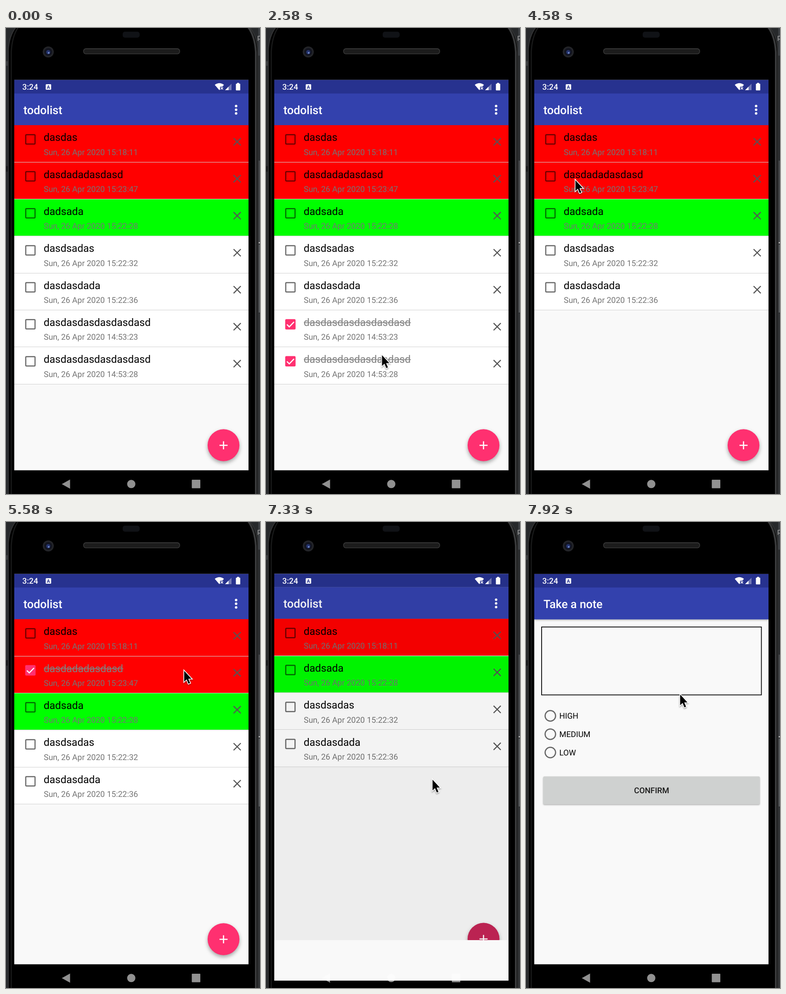
An HTML page with a canvas that plays this animation: 553 by 1012 pixels, repeating every 8 s.

```html
<!DOCTYPE html>
<html lang="en">
<head>
<meta charset="utf-8">
<title>To-do list</title>
<style>
html, body { margin: 0; width: 100%; height: 100%; overflow: hidden; background: #000; }
canvas { display: block; }
</style>
</head>
<body>
<canvas id="stage" width="553" height="1012"></canvas>
<script>
const c = document.getElementById('stage').getContext('2d');
const LOOP = 8000, OPEN = 7278, OPEN_TIME = 425;
const TOP = 112.5, HEIGHT = 848, LEFT = 18, WIDTH = 510, WINDOW_H = 906;
const PINK = '#ff3070', PAPER = '#f9f9f9';

const items = [
  { title: 'dasdas', time: '15:18:11', color: '#f00' },
  { title: 'dasdadadasdasd', time: '15:23:47', color: '#f00', check: 5050, gone: 6080 },
  { title: 'dadsada', time: '15:22:28', color: '#0f0' },
  { title: 'dasdsadas', time: '15:22:32' },
  { title: 'dasdasdada', time: '15:22:36' },
  { title: 'dasdasdasdasdasdasd', time: '14:53:23', check: 1330, gone: 3700 },
  { title: 'dasdasdasdasdasdasd', time: '14:53:28', check: 1830, gone: 4250 }
];

// pointer: time, x, y of the tip
const path = [
  [250, 560, 990], [1000, 88, 660], [1200, 52, 642], [1420, 52, 642], [1700, 53, 722],
  [1950, 53, 722], [2580, 251, 709], [3250, 503, 648], [4270, 503, 648], [4580, 106, 329],
  [4850, 53, 321], [5150, 53, 321], [5800, 506, 322], [6260, 506, 322], [6850, 474, 905],
  [7080, 474, 905], [7330, 361, 558], [7920, 334, 373], [8000, 334, 373]
];

const clamp = v => Math.max(0, Math.min(1, v));
const mix = (a, b, k) => a + (b - a) * k;

// height of a Bezier curve at x, control points as [x, y] pairs
function bezier(x, pts) {
  const at = (u, i) => {
    const v = 1 - u;
    return v * v * v * pts[0][i] + 3 * v * v * u * pts[1][i] + 3 * v * u * u * pts[2][i] + u * u * u * pts[3][i];
  };
  let lo = 0, hi = 1;
  for (let i = 0; i < 24; i++) {
    const mid = (lo + hi) / 2;
    if (at(mid, 0) < x) lo = mid; else hi = mid;
  }
  return at(lo, 1);
}
const slowIn = x => bezier(x, [[0, 0], [.4, 0], [.2, 1], [1, 1]]);
const extraSlowIn = x => x < 1 / 6
  ? bezier(x, [[0, 0], [.05, 0], [.1333, .06], [1 / 6, .4]])
  : bezier(x, [[1 / 6, .4], [.2083, .82], [.25, 1], [1, 1]]);

function rect(x, y, w, h, fill, r = 0) {
  c.beginPath();
  c.roundRect(x, y, w, h, r);
  c.fillStyle = fill;
  c.fill();
}
function disc(x, y, r, fill) {
  c.beginPath();
  c.arc(x, y, r, 0, 7);
  c.fillStyle = fill;
  c.fill();
}
function shape(d, fill) {
  c.fillStyle = fill;
  c.fill(new Path2D(d));
}
function line(d, color, width) {
  c.strokeStyle = color;
  c.lineWidth = width;
  c.stroke(new Path2D(d));
}
function text(str, x, y, size, color, weight = 400, align = 'left') {
  c.font = `${weight} ${size}px Roboto, sans-serif`;
  c.textRendering = 'geometricPrecision';
  c.textAlign = align;
  c.fillStyle = color;
  c.fillText(str, x, y);
}
function shadow(color, blur, y) {
  c.shadowColor = color;
  c.shadowBlur = blur;
  c.shadowOffsetY = y;
}
const noShadow = () => shadow('transparent', 0, 0);

function phone() {
  rect(0, 0, 553, 1012, '#27292b');
  rect(0, 72, 4, 10, '#3b3d3f');
  rect(0, 300, 4, 12, '#17181a');
  rect(549, 0, 4, 60, '#3a3d41');
  rect(550, 288, 3, 177, '#45474a');
  rect(550, 465, 3, 3, '#aaa');
  rect(550, 470, 3, 148, '#55585a');
  rect(550, 620, 3, 392, '#303234');
  text('p', 547, 25, 15, '#aaa');
  const body = 'M22 -2Q7 16 5 48V1014H548V48Q546 16 530 -2Z';
  shape(body, '#000');
  line(body, '#333435', 2);
  line('M27 -2Q13 18 11.5 52V1014', '#191a1a', 2.5);
  line('M527 -2Q542 18 544 52V1014', '#3a3b3c', 4);
  rect(254, 8, 37, 13, '#101216', 5);
  rect(168, 44, 211, 13, '#353535', 6);
  rect(169.5, 46, 208, 9.5, '#1c1c1c', 5);
  disc(92, 52, 12, '#232428');
  disc(92, 52, 8.5, '#12141f');
  disc(92, 52.5, 4.5, '#24336c');
  disc(93, 54, 1.8, '#7f98d8');
}

function statusIcons() {
  text('3:24', 35.5, 134, 17.4, '#fff', 500);
  rect(86.5, 122, 11.8, 12, '#fff', 1.5);
  text('A', 92.4, 131.8, 10.5, '#27328f', 700, 'center');
  shape('M464.5 135L454.5 123.5Q464.5 116 474.5 123.5Z', '#fff');
  rect(466, 127.5, 8, 8, '#27328f');
  line('M467.5 128.5L472.5 133.5M472.5 128.5L467.5 133.5', '#fff', 1.5);
  shape('M477 135L491 121V135Z', 'rgba(255,255,255,.35)');
  shape('M477 135L484.5 127.5V135Z', '#fff');
  rect(500.5, 121, 9.5, 14.5, '#fff', 1);
  rect(503, 119.2, 4.5, 3, '#fff');
}

function bars(title) {
  rect(LEFT, TOP, WIDTH, HEIGHT, PAPER);
  shadow('rgba(0,0,0,.3)', 4, 1.5);
  rect(LEFT, 142, WIDTH, 69.4, '#3341ad');
  noShadow();
  rect(LEFT, TOP, WIDTH, 29.8, '#27328f');
  text(title, 38, 186.7, 25, '#fff', 500);
}

function checkbox(y, k) {
  c.beginPath();
  c.roundRect(43, y - 10, 20.2, 20.2, 1.5);
  c.strokeStyle = 'rgba(0,0,0,.58)';
  c.lineWidth = 2.5;
  if (k < 1) c.stroke();
  if (k > 0) {
    c.globalAlpha = k;
    rect(41.8, y - 11.2, 22.6, 22.6, PINK, 2.5);
    line(`M45.5 ${y + .5}L50.7 ${y + 5.6}L61 ${y - 5}`, '#fff', 2.4);
    c.globalAlpha = 1;
  }
}

function row(item, i, t) {
  const y = 211.2 + 80.33 * i, top = Math.round(y), bottom = Math.round(y + 80.33);
  rect(LEFT, top, WIDTH, bottom - top - 1, item.color || '#fff');
  rect(LEFT, bottom - 1, WIDTH, 1, '#d2d2d2');
  const done = t >= item.check;
  checkbox(y + 30.5, done ? clamp((t - item.check) / 120) : 0);
  text(item.title, 82, y + 34.25, 22.6, done ? '#808080' : '#000');
  if (done) rect(82.5, y + 26.3, c.measureText(item.title).width, 1.6, '#808080');
  text('Sun, 26 Apr 2020 ' + item.time, 82.2, y + 64.6, 17.6, '#757575');
  line(`M495.5 ${y + 28}l15.6 15.6m0 -15.6l-15.6 15.6`, '#555', 2.3);
}

function listScreen(t) {
  bars('todolist');
  for (const y of [169.5, 177.5, 185.5]) disc(501, y, 2.7, '#fff');
  items.filter(it => !(t >= it.gone)).forEach((it, i) => row(it, i, t));
  shadow('rgba(0,0,0,.35)', 9, 4);
  disc(473.6, 906, 34.7, PINK);
  noShadow();
  const press = clamp((t - 7080) / 150);
  if (press) disc(473.6, 906, 34.7, `rgba(0,0,0,${.23 * press})`);
  line('M464.8 906.3h17.6M473.6 897.5v17.6', '#fff', 2.5);
}

function noteScreen() {
  bars('Take a note');
  c.strokeStyle = '#000';
  c.lineWidth = 1.7;
  c.strokeRect(34, 228, 478.5, 147.5);
  ['HIGH', 'MEDIUM', 'LOW'].forEach((label, i) => {
    const y = 421 + 39.8 * i;
    c.beginPath();
    c.arc(53, y, 11.4, 0, 7);
    c.strokeStyle = '#666';
    c.lineWidth = 2.5;
    c.stroke();
    text(label, 72.5, y + 6.4, 17.4, '#000');
  });
  shadow('rgba(0,0,0,.3)', 3, 1.5);
  rect(37.5, 552.5, 471.5, 60.5, '#cfd1d0', 2.5);
  noShadow();
  text('CONFIRM', 273.5, 589.2, 17.4, '#1a1a1a', 500, 'center');
}

function screens(t) {
  const k = clamp((t - OPEN) / OPEN_TIME), move = slowIn(k);
  c.save();
  c.beginPath();
  c.rect(LEFT, TOP, WIDTH, 1012 - TOP);
  c.clip();
  rect(LEFT, TOP, WIDTH, 900, '#000');
  if (k < 1) {
    c.save();
    c.translate(0, -18 * move);
    listScreen(t);
    c.restore();
    const dim = .1 * clamp((t - OPEN) / 117);
    if (dim) rect(LEFT, TOP, WIDTH, 900, `rgba(0,0,0,${dim})`);
  }
  if (k > 0) {
    c.translate(0, 37.2 * (1 - move));
    c.beginPath();
    c.rect(LEFT, TOP + WINDOW_H * (1 - extraSlowIn(k)), WIDTH, WINDOW_H);
    c.clip();
    rect(LEFT, TOP + HEIGHT, WIDTH, 60, '#000');
    noteScreen();
  }
  c.restore();
}

function navigation() {
  const white = 'rgba(255,255,255,.57)';
  shape('M121.5 990.5L139.5 980.5V1000.5Z', white);
  disc(272.7, 990.3, 9, white);
  rect(404.5, 981, 18.6, 18.6, white, 1);
}

function pointer(t) {
  if (t < path[0][0]) return;
  const i = Math.max(1, path.findIndex(p => p[0] > t));
  const a = path[i - 1], b = path[i];
  const k = (t - a[0]) / (b[0] - a[0]), e = k * k * (3 - 2 * k);
  c.save();
  c.translate(mix(a[1], b[1], e) + .5, mix(a[2], b[2], e));
  c.scale(1.06, 1.06);
  const arrow = 'M1 1.5V23.5L6 18.8L9.8 27.8L13.2 26.3L9.4 17.6H16Z';
  shadow('rgba(0,0,0,.35)', 3, 2);
  line(arrow, '#fff', 3);
  noShadow();
  shape(arrow, '#000');
  c.restore();
}

function frame(now) {
  const t = now % LOOP;
  phone();
  screens(t);
  statusIcons();
  navigation();
  pointer(t);
  requestAnimationFrame(frame);
}
requestAnimationFrame(frame);
</script>
</body>
</html>
```
